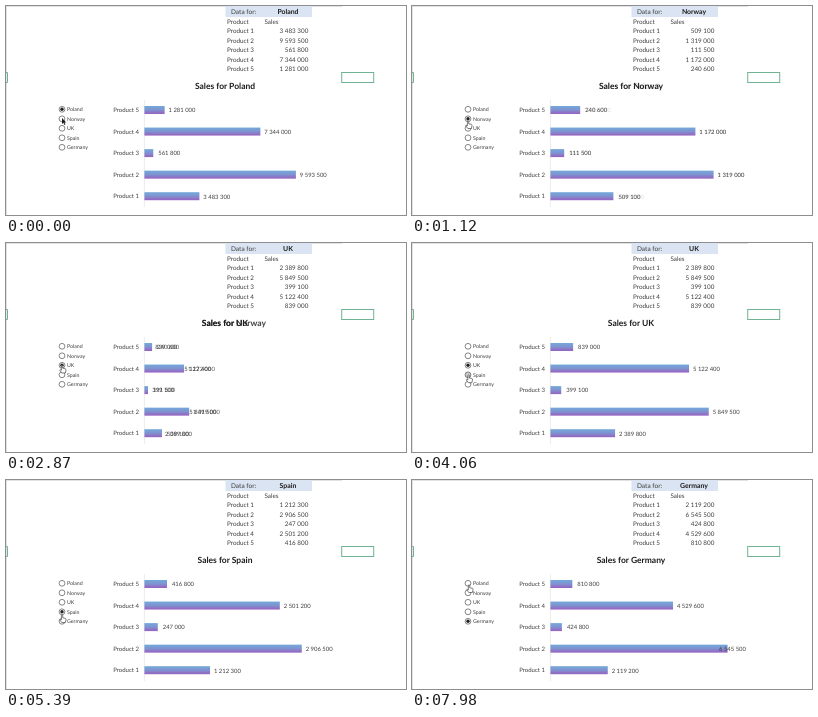
An HTML page for the animation above (8000 ms loop, 400 by 209 pixels).

```html
<!DOCTYPE html>
<html lang="en">
<head>
<meta charset="utf-8">
<title>Sales by country</title>
<style>
  html, body { margin: 0; width: 100%; height: 100%; overflow: hidden; background: #fff; }
  svg { display: block; width: 400px; height: 209px; }
  text { font-family: Lato, Carlito, "Open Sans", sans-serif; fill: #3c3c3c; text-rendering: geometricPrecision; white-space: pre; }
  .bold { font-weight: 700; fill: #1c1c1c; }
</style>
</head>
<body>
<svg id="stage" viewBox="0 0 400 209">
  <defs>
    <linearGradient id="fill" x1="0" y1="0" x2="0" y2="1">
      <stop offset="0" stop-color="#74a9da"/>
      <stop offset=".5" stop-color="#7f92d0"/>
      <stop offset="1" stop-color="#9860c0"/>
    </linearGradient>
  </defs>
</svg>
<script>
const LOOP = 8000, STEP = 70, MORPH = 840;
const LEFT = 138.4, PLOT = 189.5, LABEL_MAX = 307;

// Sales in hundreds, products 1 to 5; max is the axis end.
const countries = [
  { name: 'Poland',  max: 120000, sales: [34833, 95935, 5618, 73440, 12810] },
  { name: 'Norway',  max: 14000,  sales: [5091, 13190, 1115, 11720, 2406] },
  { name: 'UK',      max: 70000,  sales: [23898, 58495, 3991, 51224, 8390] },
  { name: 'Spain',   max: 35000,  sales: [12123, 29065, 2470, 25012, 4168] },
  { name: 'Germany', max: 70000,  sales: [21192, 65455, 4248, 45296, 8108] }
];
const clicks = [350, 2380, 4200, 6300];
const hovers = [[2100, 2450, 2], [4060, 4270, 3]];
const path = [
  [0, 56, 112], [210, 56, 114.5], [1610, 56, 114.5], [2100, 56, 122],
  [3220, 56, 122], [3780, 56.5, 131], [3990, 56.5, 131], [4060, 56.5, 131.7],
  [4200, 56.5, 131.7], [4270, 56, 133], [5320, 56, 133], [5740, 56, 142.5],
  [7770, 56, 142.5], [7980, 57, 104.5], [8000, 57, 104.5]
];

const stage = document.getElementById('stage');
const lerp = (a, b, k) => a + (b - a) * k;
const clamp = k => Math.max(0, Math.min(1, k));
const smooth = k => k * k * (3 - 2 * k);
const soft = k => lerp(k, smooth(k), 0.75);
const money = n => String(n * 100).replace(/\B(?=(\d{3})+$)/g, ' ');

function add(tag, attrs, parent = stage) {
  const el = document.createElementNS('http://www.w3.org/2000/svg', tag);
  set(el, attrs);
  return parent.appendChild(el);
}
function set(el, attrs) {
  for (const key in attrs) el.setAttribute(key, attrs[key]);
}
// Text placed by its vertical middle.
function write(str, x, mid, size, anchor = 'start', cls = '') {
  const el = add('text', { x, y: mid + size * 0.35, 'font-size': size, 'text-anchor': anchor, class: cls });
  el.textContent = str;
  return el;
}

// Sheet
add('path', { d: 'M0 .4H336M.4 0V209', stroke: '#d6d6d6', 'stroke-width': 0.8 });
add('rect', { x: 219.5, y: 0, width: 86.5, height: 11, fill: '#dae4f2' });
add('rect', { x: 335.7, y: 66.5, width: 32, height: 10, fill: 'none', stroke: '#6fb392', 'stroke-width': 1 });
add('path', { d: 'M0 66.5H1.5V76.5H0', fill: 'none', stroke: '#6fb392', 'stroke-width': 1 });
write('Data for:', 225, 5.7, 6.5);
write('Product', 221, 15.6, 6.3);
write('Sales', 258.5, 15.6, 6.3);
const head = write('', 282, 5.7, 6.9, 'middle', 'bold');
const cells = [0, 1, 2, 3, 4].map(i => {
  const y = 24.9 + i * 9.5;
  write('Product ' + (i + 1), 221, y, 6.3);
  return write('', 302.3, y, 6.3, 'end');
});

// Chart
add('path', { d: 'M138.4 94V201', stroke: '#e4e4e4', 'stroke-width': 0.7 });
const titles = [0, 1].map(() => write('', 0, 79.8, 8.5, 'start', 'bold'));
const bars = [0, 1, 2, 3, 4].map(i => {
  const y = 190.2 - i * 21.55;
  write('Product ' + (i + 1), 133, y, 6, 'end');
  return {
    rect: add('rect', { x: LEFT, y: y - 4, height: 8, fill: 'url(#fill)' }),
    labels: [0, 1].map(() => write('', 0, y + 0.3, 5.9))
  };
});

// Option buttons
const radios = countries.map((c, i) => {
  const y = 103.3 + i * 9.5;
  write(c.name, 61, y, 5.25);
  return {
    ring: add('circle', { cx: 56, cy: y, r: 2.9, stroke: '#555', 'stroke-width': 0.7 }),
    dot: add('circle', { cx: 56, cy: y, r: 1.7, fill: '#222' })
  };
});

// Pointer
const pointer = add('g', {});
const arrow = add('path', { d: 'M0 0V6L1.4 4.8L2.4 7L3.4 6.5L2.5 4.4H4.3Z', fill: '#222' }, pointer);
const hand = add('path', {
  d: 'M-.6 .6Q0-.3 .7 .6V3.2L3.4 3.8Q4.2 4.1 4 5L3.4 8H-.2L-2.3 5.2Q-2.2 4.2-.6 5.2Z',
  fill: '#fff', stroke: '#444', 'stroke-width': 0.7, 'stroke-linejoin': 'round'
}, pointer);

const width = (value, max) => PLOT * value / max;
const gap = value => value < 10000 ? 5 : 3.9;
const labelX = (end, value) => Math.min(end + gap(value), LABEL_MAX);

function pointerAt(t) {
  const i = path.findIndex(p => p[0] > t) - 1;
  const [a, b] = [path[i], path[i + 1]];
  const k = (t - a[0]) / (b[0] - a[0]);
  return [lerp(a[1], b[1], k), lerp(a[2], b[2], k)];
}

// Values (smooth) and axis (soft) change one after the other, through the smaller scale.
function drawBar(bar, i, from, to, p) {
  const a = from.sales[i], b = to.sales[i];
  const grows = to.max > from.max;
  const start = width(a, from.max), final = width(b, to.max);
  const mid = grows ? width(a, to.max) : width(b, from.max);
  const [ease1, ease2] = grows ? [soft, smooth] : [smooth, soft];
  const second = ease2(clamp(p * 2 - 1));
  const w = p < 0.5 ? lerp(start, mid, ease1(p * 2)) : lerp(mid, final, second);
  const end = LEFT + w;
  let newX = labelX(end, b);
  if (grows) {
    const shift = Math.min(0, final - start) * from.max / to.max;
    newX = end + labelX(LEFT + final, b) - LEFT - final + shift * (1 - second);
  }
  set(bar.rect, { width: w });
  fade(bar.labels, [money(a), money(b)], [labelX(end, a), newX], p);
}

function fade(pair, strings, xs, p) {
  pair.forEach((el, n) => {
    el.textContent = strings[n];
    set(el, { x: xs[n], opacity: clamp(2 * (n ? p : 1 - p)) });
  });
}

function draw(time) {
  const t = Math.floor(time / STEP) * STEP;
  const now = clicks.filter(c => t > c).length;
  const to = countries[now], from = countries[Math.max(0, now - 1)];
  const p = now ? clamp((t - clicks[now - 1]) / MORPH) : 1;

  head.textContent = to.name;
  cells.forEach((el, i) => { el.textContent = money(to.sales[i]); });
  bars.forEach((bar, i) => drawBar(bar, i, from, to, p));

  titles[1].textContent = 'Sales for ' + to.name;
  const x = 219 - titles[1].getComputedTextLength() / 2;
  fade(titles, ['Sales for ' + from.name, 'Sales for ' + to.name], [x, x], p);

  radios.forEach((r, i) => {
    const hot = hovers.some(h => h[2] === i && t >= h[0] && t < h[1]);
    set(r.ring, { fill: hot ? '#ccc' : '#fff' });
    set(r.dot, { opacity: i === now ? 1 : 0 });
  });

  set(pointer, { transform: `translate(${pointerAt(t)})` });
  set(arrow, { opacity: t < 140 ? 1 : 0 });
  set(hand, { opacity: t < 140 ? 0 : 1 });
}

const begin = performance.now();
function tick() {
  draw((performance.now() - begin) % LOOP);
  requestAnimationFrame(tick);
}
tick();
</script>
</body>
</html>
```
